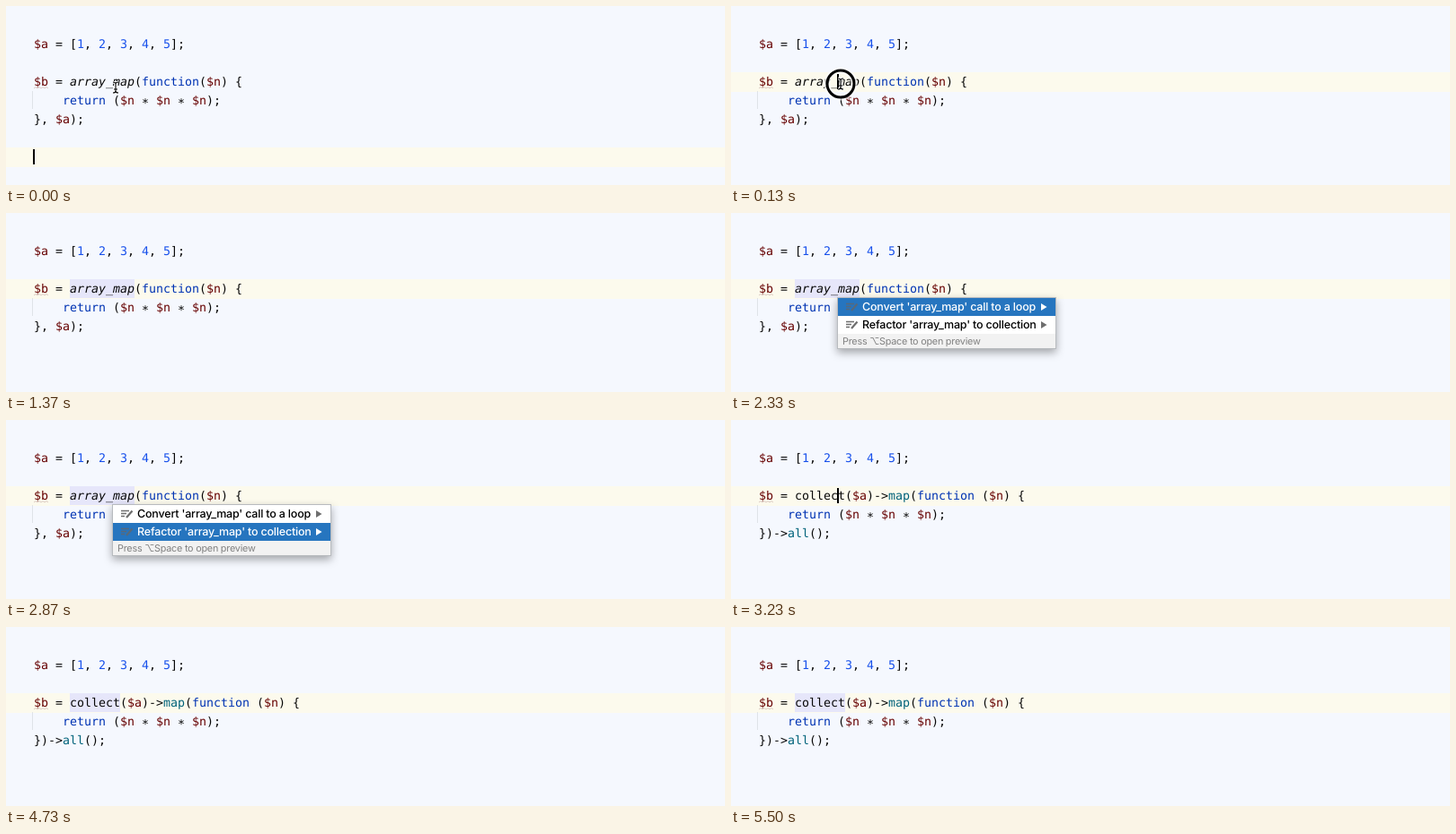
Recreate the animation shown at these times as an HTML page. Size 800x200 px, loop 5.56 s.

```html
<!DOCTYPE html>
<html lang="en">
<head>
<meta charset="utf-8">
<title>Refactoring in an editor</title>
<style>
  html, body { margin: 0; width: 100%; height: 100%; overflow: hidden; background: #f5f8fe; }
  svg { display: block; }
  text { white-space: pre; text-rendering: geometricPrecision; }
  .code { font: 13.29px "DejaVu Sans Mono", monospace; fill: #080808; }
  .var { fill: #660000; }
  .num { fill: #1750eb; }
  .key { fill: #0033b3; }
  .method { fill: #00627a; }
  .builtin { font-style: italic; }
  .item { font: 500 12.5px Inter, sans-serif; letter-spacing: -.19px; fill: #000; }
  .hint { font: 10.8px Inter, sans-serif; letter-spacing: -.22px; fill: #808080; }
  .icon { fill: none; stroke: #6e6e6e; stroke-width: 1.3; }
  .arrow { fill: #6e6e6e; }
  .back { fill: #fff; }
  .on .back { fill: #2675bf; }
  .on .item, .on .arrow { fill: #fff; }
  .on .icon { stroke: #58697a; }
  #popup { filter: drop-shadow(0 4px 5px #0005); }
</style>
</head>
<body>
<svg width="800" height="200" viewBox="0 0 800 200">
  <rect id="line" width="800" height="22" fill="#fcfaed"/>
  <rect id="mark" x="71" y="74" height="21" fill="#e6e6fa"/>
  <path d="M29.5 95V115" stroke="#dfe3e8"/>
  <path d="M31 92l2-1.5 2 1.5 2-1.5 2 1.5 2-1.5 2 1.5 2-1.5 2 1.5" fill="none" stroke="#d3beb8" stroke-width=".8"/>
  <g id="before" class="code"></g>
  <g id="after" class="code"></g>
  <rect id="caret" width="2" height="17"/>
  <g id="popup">
    <rect x="118.5" y="94.5" width="243" height="57" fill="#f2f2f2" stroke="#b8bbbf"/>
    <g id="rows"></g>
    <text class="hint" x="124" y="147">Press ⌥Space to open preview</text>
  </g>
  <g id="ring" fill="none">
    <circle cx="122" cy="87" r="15" stroke="#fff" stroke-opacity=".65" stroke-width="7"/>
    <circle cx="122" cy="87" r="15" stroke="#000" stroke-width="3"/>
  </g>
  <g id="pointer" fill="none">
    <path id="beam" d="M-3-6Q0-6 0-4V4Q0 6-3 6M3-6Q0-6 0-4M0 4Q0 6 3 6M-2 2H2" stroke="#fff" stroke-width="2.6"/>
    <use href="#beam" style="stroke:#000"/>
    <path d="M-3-6Q0-6 0-4V4Q0 6-3 6M3-6Q0-6 0-4M0 4Q0 6 3 6M-2 2H2" stroke="#000" stroke-width="1.1"/>
  </g>
</svg>
<script>
const LOOP = 5560, CLICK = 60, MARK = 560, OPEN = 2300, DOWN = 2800, APPLY = 2930, REMARK = 3300;
const $ = id => document.getElementById(id);
const show = (id, on) => $(id).setAttribute('visibility', on ? 'visible' : 'hidden');
const set = (id, attrs) => Object.entries(attrs).forEach(([k, v]) => $(id).setAttribute(k, v));

const tokens = [
  ['var', /^\$\w+$/], ['num', /^\d+$/], ['key', /^(function|return)$/],
  ['builtin', /^array_map$/], ['method', /^(map|all)$/]
];
const paint = line => line.replace(/\$?\w+|[*>]/g, word => {
  if (word === '*') return '<tspan baseline-shift="-3">*</tspan>';
  if (word === '>') return '&gt;';
  const kind = tokens.find(([, test]) => test.test(word));
  return kind ? `<tspan class="${kind[0]}">${word}</tspan>` : word;
});
const listing = lines => lines.map((line, i) =>
  `<text x="31" y="${47 + 21 * i}">${paint(line)}</text>`).join('');

const first = '$a = [1, 2, 3, 4, 5];', body = '    return ($n * $n * $n);';
$('before').innerHTML = listing([first, '', '$b = array_map(function($n) {', body, '}, $a);']);
$('after').innerHTML = listing([first, '', '$b = collect($a)->map(function ($n) {', body, '})->all();']);

$('rows').innerHTML = ["Convert 'array_map' call to a loop", "Refactor 'array_map' to collection"].map((label, i) =>
  `<g transform="translate(119 ${95 + 20 * i})">
    <rect class="back" width="242" height="20"/>
    <path class="icon" d="M9 6.5H18M9 9.5H15M9 12.5H13"/>
    <path class="icon" d="M15 14L21.5 6.5" style="stroke-width:2.2"/>
    <text class="item" x="27" y="14.3">${label}</text>
    <path class="arrow" d="M226 6L232.5 10L226 14Z"/>
  </g>`).join('');
const rows = $('rows').children;

function caretOn(t) {
  if (t < 1170) return true;
  if (t < APPLY) return t >= 1700 && t < 2200;
  return (t - APPLY) % 1000 < 500;
}

function draw() {
  const t = performance.now() % LOOP;
  const clicked = t >= CLICK, applied = t >= APPLY;

  set('line', { y: clicked ? 74 : 158 });
  set('caret', { x: clicked ? 118 : 30, y: clicked ? 76 : 160 });
  show('caret', caretOn(t));

  show('mark', t >= MARK && !applied || t >= REMARK);
  set('mark', { width: applied ? 56 : 72 });
  show('before', !applied);
  show('after', applied);

  show('popup', t >= OPEN && !applied);
  const picked = t < DOWN ? 0 : 1;
  [...rows].forEach((row, i) => row.classList.toggle('on', i === picked));

  show('ring', clicked && t < 530);
  set('ring', { opacity: Math.min(1, (530 - t) / 200) });
  show('pointer', t < 640);
  set('pointer', { transform: `translate(122 ${91 - 4 * Math.min(1, t / CLICK)})` });

  requestAnimationFrame(draw);
}
draw();
</script>
</body>
</html>
```
